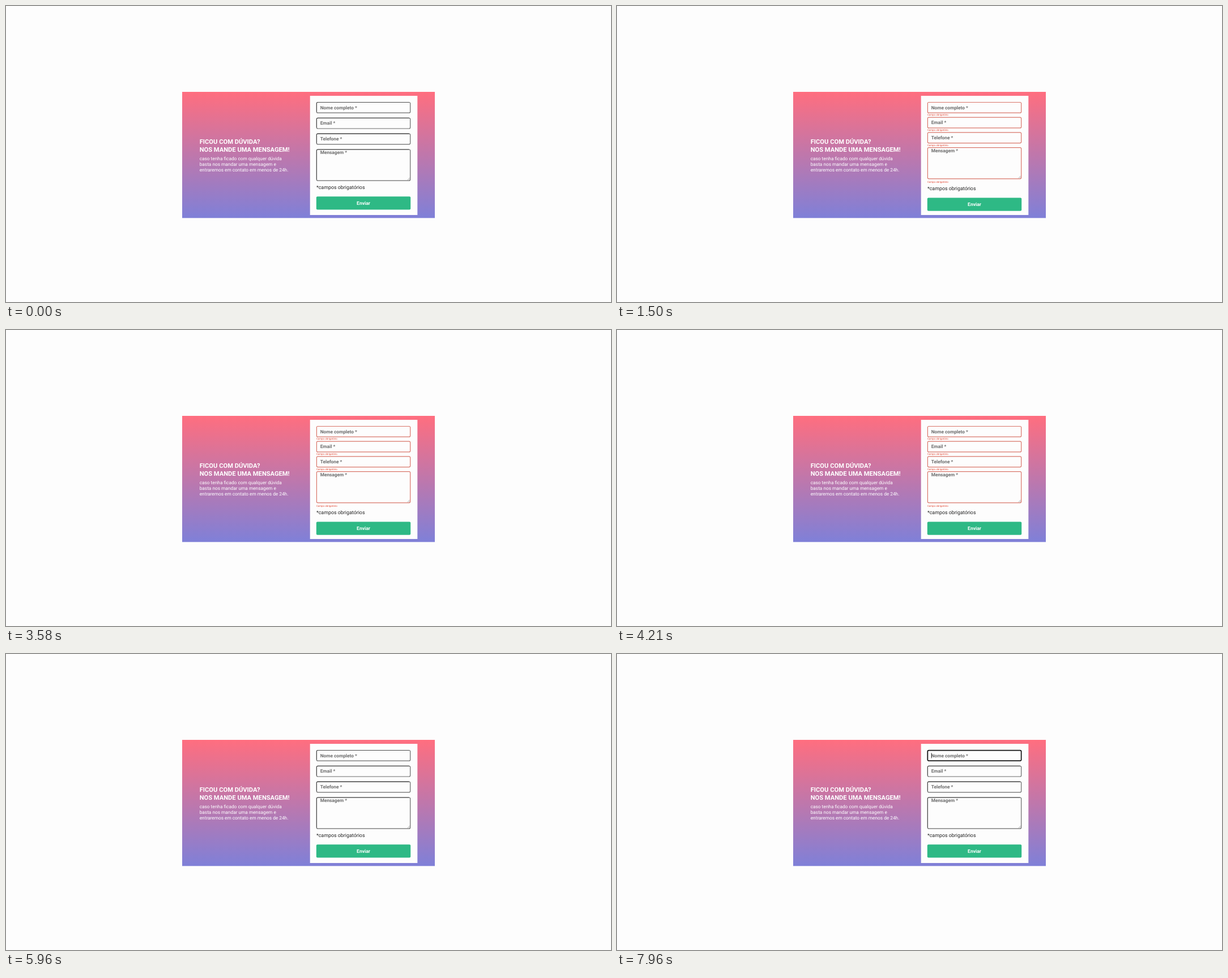
Write an HTML page that moves like this. It is 1068 by 524 pixels and loops after 8 s.

```html
<!DOCTYPE html>
<html lang="pt-BR">
<head>
<meta charset="utf-8">
<title>Formulário de contato</title>
<style>
  html, body { margin: 0; width: 100%; height: 100%; overflow: hidden; background: #fdfdfd; }
  svg { display: block; width: 1068px; height: 524px; }
  text { font-family: Roboto, sans-serif; font-size: 8.3px; text-rendering: geometricPrecision; }
  .title { font-size: 11.15px; font-weight: 700; fill: #fff; }
  .lead { fill: #fff; }
  .label { font-weight: 700; fill: #6c6c6c; }
  .note { font-size: 8.9px; fill: #222; }
  .send { font-size: 8.5px; font-weight: 700; fill: #fff; text-anchor: middle; }
  .error { font-size: 4.45px; fill: #e2432f; }
  .box { fill: #fdfdfd; stroke: #6a6a6a; stroke-width: 1.2; }
  .invalid .box { stroke: #d9766a; }
  .edge { fill: none; stroke: #4c4c4c; stroke-width: 1.2; }
  .grip { stroke: #777; stroke-width: .6; }
</style>
</head>
<body>
<svg viewBox="0 0 1068 524">
  <defs>
    <linearGradient id="sky" x1="0" y1="0" x2="0" y2="1">
      <stop offset="0" stop-color="#ff6e7f"/>
      <stop offset="1" stop-color="#7f80d8"/>
    </linearGradient>
  </defs>
  <rect width="1068" height="524" fill="#fdfdfd"/>
  <rect x="311" y="152" width="446" height="223.3" fill="url(#sky)"/>
  <text class="title" x="341.7" y="244.2">FICOU COM DÚVIDA?</text>
  <text class="title" x="341.7" y="257.8">NOS MANDE UMA MENSAGEM!</text>
  <text class="lead" x="341.7" y="273.2">caso tenha ficado com qualquer dúvida</text>
  <text class="lead" x="341.7" y="283.2">basta nos mandar uma mensagem e</text>
  <text class="lead" x="341.7" y="293.2">entraremos em contato em menos de 24h.</text>
  <rect x="536.7" y="159" width="189.6" height="211" fill="#fdfdfd"/>
  <g id="plain"></g>
  <g id="invalid" class="invalid"></g>
  <g id="focus">
    <rect x="548.4" y="170.6" width="165.2" height="18.4" rx="2" fill="none" stroke="#101010" stroke-width="1.6"/>
    <path id="caret" d="M555.2 175V184.5" stroke="#111" stroke-width=".8"/>
  </g>
</svg>
<script>
const LOOP = 8000;
const INVALID_AT = 1500, RESET_AT = 5500, FOCUS_AT = 7500, BLINK = 500;
const labels = ['Nome completo *', 'Email *', 'Telefone *', 'Mensagem *'];
const $ = id => document.getElementById(id);
const text = (cls, x, y, str) => `<text class="${cls}" x="${x}" y="${y}">${str}</text>`;

function field(label, y, invalid) {
  const area = label === labels[3];
  const h = area ? 55.2 : 18.7;
  let out = `<rect class="box" x="548.4" y="${y}" width="165.2" height="${h}" rx="2"/>`;
  if (!invalid) {
    out += `<path class="edge" d="M548.4 ${y + h - 2}V${y + 2}q0-2 2-2H711.6"/>`;
  }
  out += text('label', 554.7, y + (area ? 8.3 : 12), label);
  if (area) {
    out += `<path class="grip" d="M708.7 ${y + h - 1}l4-4M711 ${y + h - 1}l1.7-1.7"/>`;
  }
  if (invalid) out += text('error', 547.9, y + h + (area ? 6.9 : 4.9), 'Campo obrigatório');
  return out;
}

function form(tops, shift, invalid) {
  return labels.map((label, i) => field(label, tops[i], invalid)).join('') +
    text('note', 547.9, 323.9 + shift, '*campos obrigatórios') +
    `<rect x="547.8" y="${337.2 + shift}" width="166.4" height="23.4" rx="2" fill="#2eb985"/>` +
    text('send', 631, 352 + shift, 'Enviar');
}

$('plain').innerHTML = form([170.5, 198.3, 226.1, 254], 0, false);
$('invalid').innerHTML = form([170.5, 197.2, 223.9, 250.6], 2.2, true);

const show = (id, on) => $(id).setAttribute('visibility', on ? 'visible' : 'hidden');

function draw() {
  const t = performance.now() % LOOP;
  const invalid = t >= INVALID_AT && t < RESET_AT;
  const focus = t >= FOCUS_AT;
  show('plain', !invalid);
  show('invalid', invalid);
  show('focus', focus);
  show('caret', focus && Math.floor((t - FOCUS_AT) / BLINK) % 2 === 0);
  requestAnimationFrame(draw);
}
draw();
</script>
</body>
</html>
```
